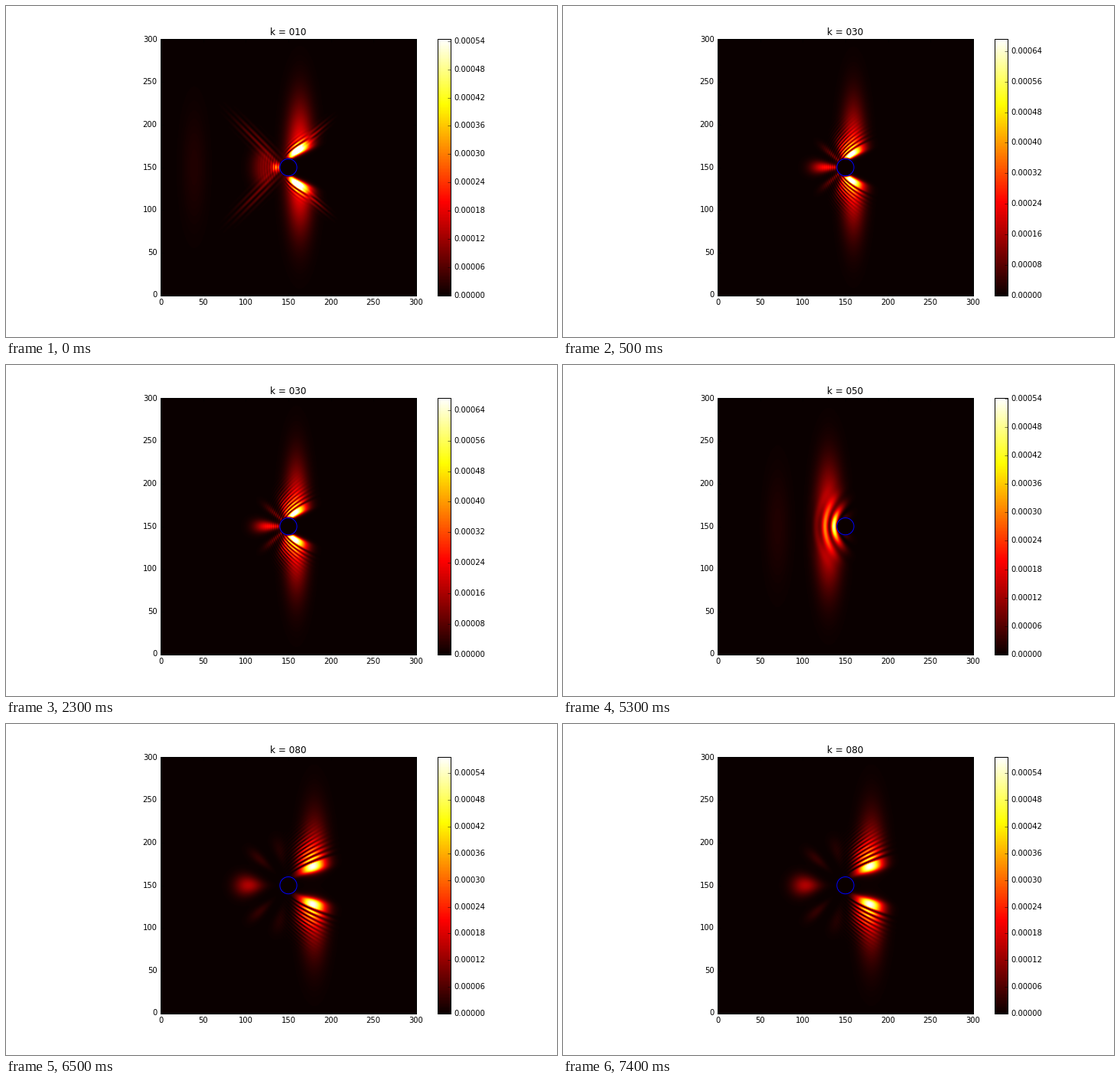
Recreate the animation shown at these times as a matplotlib script. Size 720 by 432 pixels, loop 8000 ms.

```python
import matplotlib.pyplot as plt
import numpy as np
from matplotlib.animation import FuncAnimation

W, H, DPI = 720, 432, 72
plt.style.use("classic")
plt.rcParams.update({
    "figure.facecolor": "white",
    "savefig.facecolor": "white",
    "savefig.dpi": "figure",
    "font.size": 10,
    "axes.titlesize": 12,
    "font.family": "DejaVu Sans",
})

RADIUS = 10
axis = np.arange(301)
X, Y = np.meshgrid(axis, axis)
U, V = X - 150.0, np.abs(Y - 150.0)
R = np.maximum(np.hypot(U, V), 1e-6)
THETA = np.arctan2(V, U)                # scattering angle
BACK = 180 - np.degrees(THETA)          # angle away from straight back
C = R - U                               # constant along fringe parabolas


def bell(x, width):
    return np.exp(-(x / width) ** 2)


def step(x, width):
    return 1 / (1 + np.exp(-np.clip(x / width, -50, 50)))


def scatter(u0, su, power, gain, ss, lam, c0, edge, soft, angular,
            delay=None, broad_first=True):
    """Intensity of a wave packet interfering with its scattered ring."""
    packet = np.sqrt(power) * bell(U - u0, 2 * su) * bell(V, 92)
    if delay is None:
        delay = u0 + 2 * RADIUS * np.sin(THETA / 2)
    spread = np.sqrt(RADIUS / np.maximum(2 * R - RADIUS, RADIUS))
    ring = gain * angular * spread * bell(R - delay, 2 * ss)
    phase = 2 * np.pi * (C - c0) / lam
    if broad_first:
        phase = np.maximum(phase, 0)
    total = packet ** 2 + ring ** 2 + 2 * packet * ring * np.cos(phase)
    return total * step(C - edge, soft)


def lobes(back, width, side, side2, start):
    return (back * bell(BACK, width) + side * bell(BACK - 42, 9)
            + side2 * bell(BACK - 75, 12) + step(BACK - start, 6))


def ghost(x, power):
    return power * bell(X - x, 14) * bell(V, 64)


def outside(field):
    wall = np.clip((R - RADIUS) / 2, 0, 1)
    return field * wall


def wide_fan():
    main = scatter(13, 10, 0.47, 0.85, 10, 4.6, 15.2, 8, 0.9,
                   step(BACK - 85, 7) * bell(np.maximum(C - 15, 0), 9))
    fan = np.exp(-(BACK / 36) ** 4) * (
        0.17 * bell(R - 29, 14) + 0.45 * bell(R - 14, 6) * bell(BACK, 20))
    fan *= 1 + 0.45 * np.cos(2 * np.pi * C / 6) * bell(R - 12, 16)
    across, along = (V + U) / np.sqrt(2), (V - U) / np.sqrt(2)
    left = (0.15 * bell(across + 4, 8) * np.cos(np.pi * across / 5.5) ** 2
            * bell(along - 46, 34))
    off = V - 14 - 0.82 * U
    right = (0.18 * bell(off, 7) * np.cos(np.pi * off / 6) ** 2
             * bell(U - 29, 15))
    return main + fan + left + right + ghost(39, 0.035)


def fine_fringes():
    return scatter(9, 9, 0.44, 0.64, 10, 4.6, 12.5, 6.5, 0.8,
                   lobes(2.0, 17, 1.05, 0.3, 68))


def broad_arcs():
    arcs = scatter(-20, 10, 0.38, 0.60, 11.2, 22, 28, 12, 4,
                   np.sin(THETA / 2), delay=8, broad_first=False)
    return arcs + ghost(70, 0.035)


def split_lobes():
    return scatter(30, 10, 0.45, 0.95, 10.5, 4.3, 9.5, 4.3, 0.8,
                   lobes(1.55, 18, 0.75, 0.55, 100))


# title, start time in ms, colour limit, colour tick step, field
STAGES = [
    ("k = 010", 0, 0.000544, 0.00006, outside(wide_fan())),
    ("k = 030", 500, 0.000671, 0.00008, outside(fine_fringes())),
    ("k = 050", 3500, 0.000541, 0.00006, outside(broad_arcs())),
    ("k = 080", 6500, 0.000576, 0.00006, outside(split_lobes())),
]

fig = plt.figure(figsize=(W / DPI, H / DPI), dpi=DPI)


def add_axes(x, y, w, h):
    return fig.add_axes([x / W, y / H, w / W, h / H])


ax = add_axes(201.6, 54, 334.8, 334.8)
image = ax.imshow(STAGES[0][4], cmap="hot", vmin=0, vmax=1, origin="lower",
                  aspect="auto", interpolation="bilinear")
ax.contour(axis, axis, R, levels=[RADIUS], colors="blue", linewidths=1)
ax.set(xlim=(-0.5, 300.5), ylim=(-0.5, 300.5))
ax.set_xticks(range(0, 301, 50))
ax.set_yticks(range(0, 301, 50))
title = ax.set_title("")

bar = add_axes(564.3, 54, 16.74, 334.8)
bar.imshow(np.linspace(0, 1, 256)[:, None], cmap="hot", origin="lower",
           extent=(0, 1, 0, 1), aspect="auto", interpolation="nearest")
bar.set_xticks([])
bar.yaxis.tick_right()

INTERVAL = 500


def draw(i):
    now = i * INTERVAL
    name, _, limit, gap, field = [s for s in STAGES if s[1] <= now][-1]
    image.set_data(field)
    title.set_text(name)
    ticks = np.arange(int(limit / gap) + 1) * gap
    bar.set_yticks(ticks / limit)
    bar.set_yticklabels([f"{t:.5f}" for t in ticks])
    bar.set_ylim(0, 1)
    return image, title


anim = FuncAnimation(fig, draw, frames=16, interval=INTERVAL, repeat=True,
                     repeat_delay=0, blit=False)
plt.show()
```
